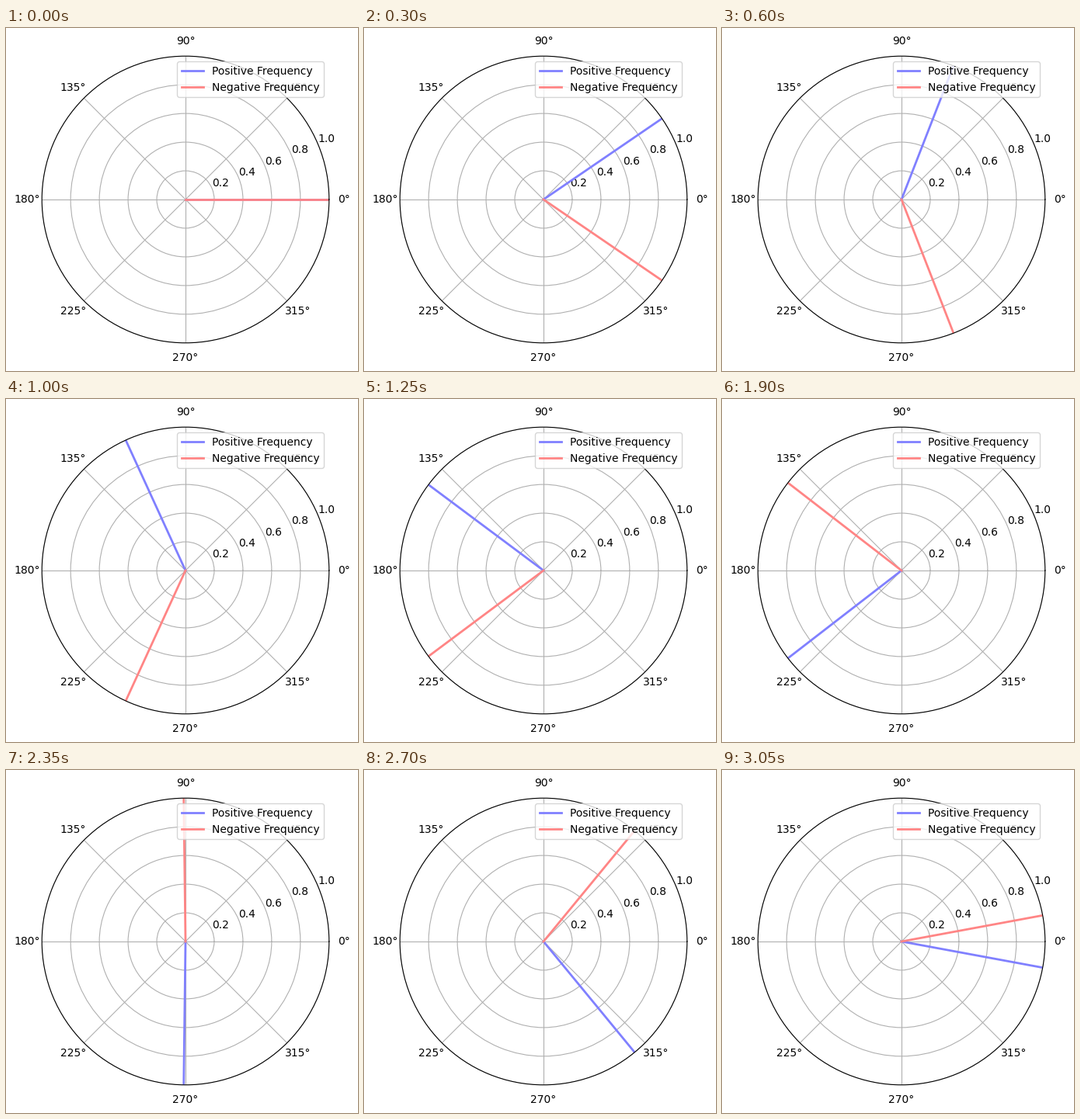
Animation of 453x442 px, one loop 3100 ms. Source, as a matplotlib script:

```python
import numpy as np
import matplotlib.pyplot as plt
from matplotlib.animation import FuncAnimation

W, H, DPI = 453, 442, 100
CX, CY, R = 231, 221, 184.8
FRAMES, STEP = 62, 0.1  # radians per frame

plt.rcParams["font.family"] = "DejaVu Sans"
fig = plt.figure(figsize=(W / DPI, H / DPI), dpi=DPI)
ax = fig.add_axes(
    [(CX - R) / W, (CY - R) / H, 2 * R / W, 2 * R / H], projection="polar"
)
ax.set_ylim(0, 1)
ax.set_yticks(np.arange(0.2, 1.01, 0.2))

positive, = ax.plot([], [], color="#8080ff", lw=2, label="Positive Frequency")
negative, = ax.plot([], [], color="#ff8585", lw=2, label="Negative Frequency")
ax.legend(loc="upper right")


def update(i):
    angle = STEP * i
    positive.set_data([0, angle], [0, 1])
    negative.set_data([0, -angle], [0, 1])
    return positive, negative


anim = FuncAnimation(fig, update, frames=FRAMES, interval=50, repeat=True)
plt.show()
```
